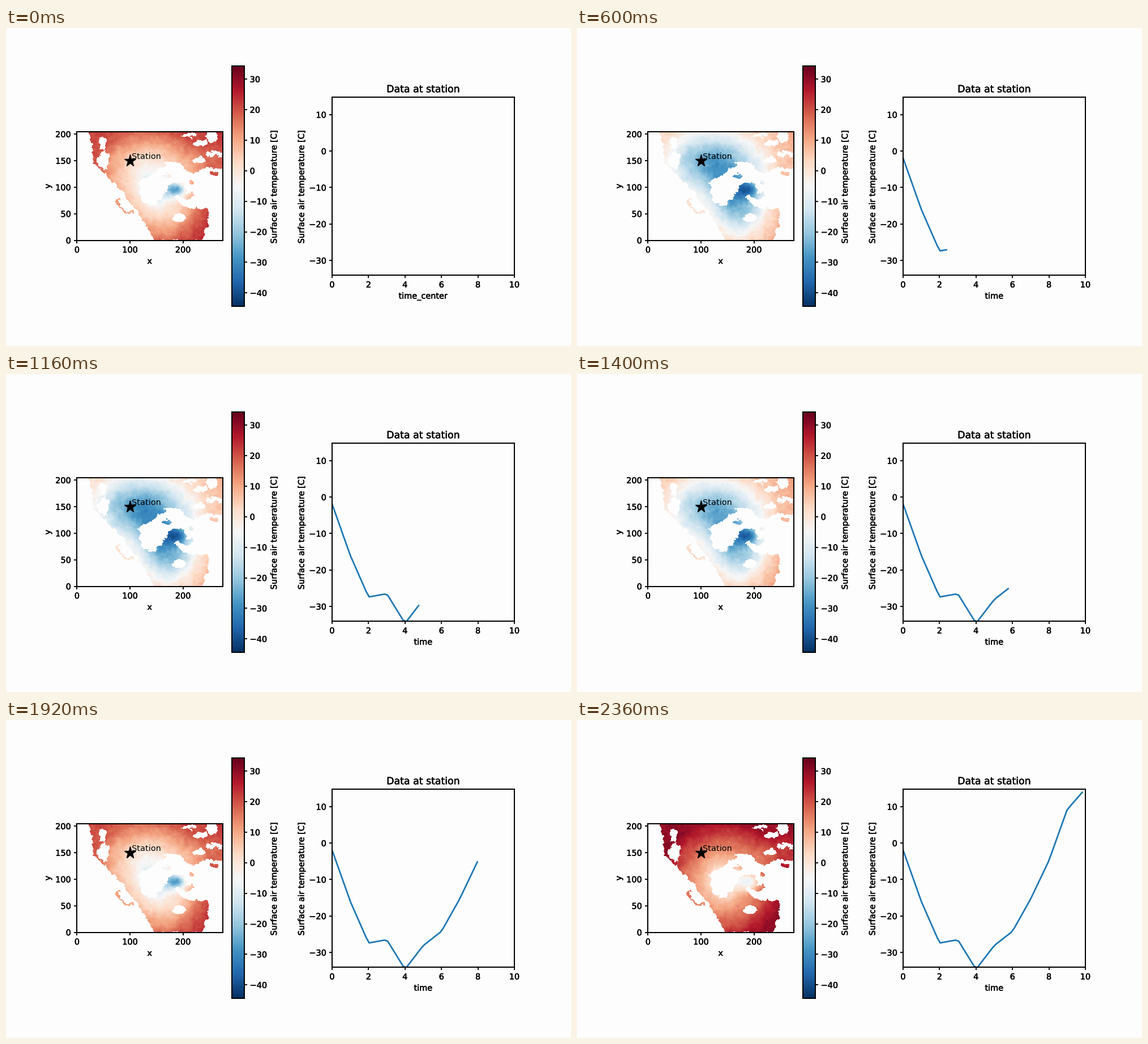
Animation of 998 by 561 pixels, one loop 2.4 s. Source, as a matplotlib script:

```python
import numpy as np
import matplotlib.pyplot as plt
from matplotlib.animation import FuncAnimation
from matplotlib.path import Path
from matplotlib.patheffects import withStroke
from matplotlib.text import Text

W, H, DPI = 998, 561, 104
FRAMES = 60
NX, NY = 275, 205
PAPER = "#fdfdfd"
LABEL = "Surface air temperature [C]"

plt.rcParams.update({
    "font.family": "DejaVu Sans", "font.size": 10,
    "axes.linewidth": 1.4, "xtick.major.width": 1.3, "ytick.major.width": 1.3,
})
rng = np.random.default_rng(12)

# Map cell centres in stage pixels
CELL = 257.5 / NX
px, py = np.meshgrid(125 + CELL * (np.arange(NX) + 0.5),
                     375 - CELL * (np.arange(NY) + 0.5))


def noise(cell):
    """Smooth noise in -1..1 with features of `cell` grid cells."""
    h, w = int(NY / cell) + 2, int(NX / cell) + 2
    grid = rng.uniform(-1, 1, (h, w))
    xs, ys = np.arange(NX) / cell, np.arange(NY) / cell
    rows = np.array([np.interp(xs, np.arange(w), r) for r in grid])
    return np.array([np.interp(ys, np.arange(h), c) for c in rows.T]).T


# Ragged coasts: shapes are tested at slightly shifted places
jx = px + 3 * noise(9) + 2.2 * noise(3)
jy = py + 3 * noise(9) + 2.2 * noise(3)


def blob(cx, cy, rx, ry):
    return ((jx - cx) / rx) ** 2 + ((jy - cy) / ry) ** 2 < 1


def bump(cx, cy, sx, sy):
    return np.exp(-((px - cx) / sx) ** 2 / 2 - ((py - cy) / sy) ** 2 / 2)


# One continuous ring of land around the polar sea
coast = [
    (141, 170), (153, 212), (154, 240), (170, 256), (190, 276), (210, 290),
    (216, 304), (230, 324), (249, 352), (264, 376), (347, 376), (355, 346),
    (356, 321), (312, 317), (287, 284), (262, 315), (239, 304), (233, 272),
    (262, 256), (278, 238), (307, 239), (326, 260), (350, 250), (385, 244),
    (385, 170),
]
seas = [
    (170, 203, 6, 12), (172, 234, 11, 16), (306, 335, 12, 7),
    (322, 190, 15, 4), (344, 204, 13, 5), (363, 193, 9, 10),
    (369, 222, 15, 5), (342, 235, 13, 5),
]
islands = [
    (302, 286, 18, 11), (320, 297, 13, 5), (276, 245, 8, 4),
    (284, 261, 9, 3), (326, 272, 4, 4), (368, 257, 7, 4),
]
cells = np.column_stack([jx.ravel(), jy.ravel()])
land = Path(coast).contains_points(cells).reshape(NY, NX)
for sea in seas:
    land &= ~blob(*sea)
for island in islands:
    land |= blob(*island)
arc = np.abs(np.hypot(jx - 220, jy - 305) - 22) < 1.5
land |= arc & (px < 226) & (py > 300)

# Summer follows the distance from the pole; winter has cold continents
pole = np.hypot(px - 258, py - 285)
ice = bump(302, 286, 14, 10)
relief = 1.3 * noise(13) + 1.2 * noise(5) + 0.7 * noise(2)
warm = (np.minimum(0.31 * pole - 4, 30) - 18 * ice
        - 8 * bump(360, 235, 30, 22) + relief)
cold = (5 - 40 * bump(235, 235, 60, 40) - 35 * bump(287, 312, 34, 40)
        - 12 * ice + 1.4 * relief)
# Ice cools early, other land later
power = np.interp(warm, [-8, 4], [0.5, 1.3])

# Station series, one value a month, resampled to the frames
monthly = np.array([-1.9, -16.0, -27.4, -26.5, -34.6, -28.1,
                    -24.2, -15.3, -4.8, 9.2, 14.9])
times = np.linspace(0, 10, FRAMES)
series = np.interp(times, np.arange(11), monthly)
chill = (monthly.max() - series) / np.ptp(monthly)


def field(i):
    return np.where(land, warm + (cold - warm) * chill[i] ** power, np.nan)


fig = plt.figure(figsize=(9.5962, 5.3943), dpi=DPI, facecolor=PAPER)


def add_axes(left, top, right, bottom):
    return fig.add_axes([left / W, 1 - bottom / H, (right - left) / W,
                         (bottom - top) / H], facecolor=PAPER)


geo = add_axes(125, 183, 382.5, 375)
bar = add_axes(398.5, 67.5, 420.5, 491)
plot = add_axes(576, 122, 898, 436.5)

image = geo.imshow(field(0), cmap="RdBu_r", vmin=-44.4, vmax=34.2,
                   origin="lower", aspect="auto", interpolation="nearest")
geo.set(xticks=[0, 100, 200], yticks=range(0, 201, 50), xlabel="x", ylabel="y")
geo.plot(100, 150, "k*", markersize=15)
station = geo.text(103.5, 153, "Station")

cbar = fig.colorbar(image, cax=bar, ticks=range(-40, 31, 10))
cbar.set_label(LABEL)
cbar.outline.set_linewidth(1.4)

line, = plot.plot([], [], color="#1f77b4", lw=1.9)
plot.set(xlim=(0, 10), ylim=(-34.1, 14.8), xticks=range(0, 11, 2),
         yticks=range(-30, 11, 10), xlabel="time", ylabel=LABEL,
         title="Data at station")

# Slightly heavier lettering
fig.draw_without_rendering()
for text in fig.findobj(Text):
    if text is not station:
        text.set_path_effects([withStroke(linewidth=0.35, foreground="k")])


def update(i):
    image.set_data(field(i))
    line.set_data(times[:i], series[:i])
    plot.set_xlabel("time" if i else "time_center")
    return image, line


anim = FuncAnimation(fig, update, frames=FRAMES, interval=40,
                     repeat=True, repeat_delay=0, blit=False)
plt.show()
```
